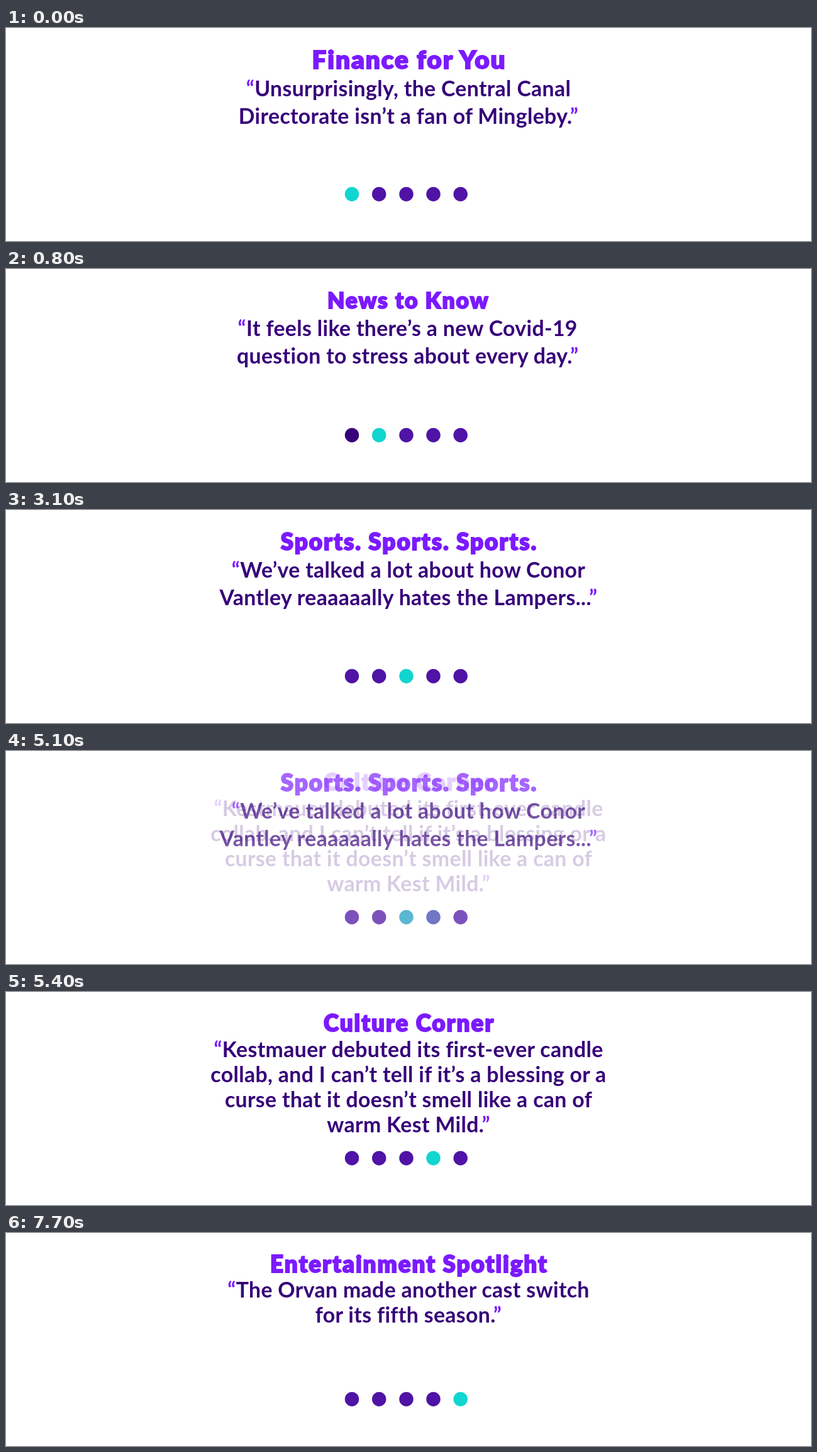
Recreate the animation shown at these times as an HTML page. Size 1280 by 340 pixels, loop 8 s.

```html
<!DOCTYPE html>
<html lang="en">
<head>
<meta charset="utf-8">
<title>Newsletter quotes</title>
<style>
  html, body { margin: 0; width: 100%; height: 100%; overflow: hidden; background: #fff; }
  svg { display: block; width: 1280px; height: 340px; }
  text { font-family: Lato, "Open Sans", sans-serif; text-anchor: middle; font-variant-ligatures: none; }
  .title { font-weight: 900; letter-spacing: 1.9px; fill: #7b1aff; stroke: #7b1aff; stroke-width: 1.8px; }
  .line { font-weight: 700; font-size: 33.8px; letter-spacing: 0.35px; fill: #360079; }
  .mark { fill: #7b1aff; }
</style>
</head>
<body>
<svg id="stage" viewBox="0 0 1280 340"></svg>
<script>
const LOOP = 8000, FIRST = 500, PERIOD = 2300, STEP = 100;
const FADE_IN = [0.2, 0.43, 0.67, 1];
const FADE_OUT = [0.67, 0.43, 0.2, 0];
const DOTS = [550, 593.2, 636.5, 679.5, 722.7];
const TEAL = '#11d5cf', PURPLE = '#4f13a5', DARK = '#360079';

const slides = [
  { title: 'Finance for You', size: 40.5, base: 64.5, x: 640, top: 109, lead: 44,
    lines: ['Unsurprisingly, the Central Canal', 'Directorate isn’t a fan of Mingleby.'] },
  { title: 'News to Know', size: 35.4, base: 63, x: 638.7, top: 107, lead: 44,
    lines: ['It feels like there’s a new Covid-19', 'question to stress about every day.'] },
  { title: 'Sports. Sports. Sports.', size: 36.8, base: 63.5, x: 640, top: 107.5, lead: 44,
    lines: ['We’ve talked a lot about how Conor', 'Vantley reaaaaally hates the Lampers...'] },
  { title: 'Culture Corner', size: 36.8, base: 63, x: 640, top: 103.5, lead: 40,
    lines: ['Kestmauer debuted its first-ever candle', 'collab, and I can’t tell if it’s a blessing or a',
            'curse that it doesn’t smell like a can of', 'warm Kest Mild.'] },
  { title: 'Entertainment Spotlight', size: 36.8, base: 62.5, x: 640, top: 103, lead: 40,
    lines: ['The Orvan made another cast switch', 'for its fifth season.'] }
];

const stage = document.getElementById('stage');

function add(parent, tag, attrs, content = '') {
  const node = document.createElementNS('http://www.w3.org/2000/svg', tag);
  for (const key in attrs) node.setAttribute(key, attrs[key]);
  node.textContent = content;
  return parent.appendChild(node);
}

function draw(slide, index) {
  const group = add(stage, 'g', {});
  const { x, lines } = slide;
  add(group, 'text', { class: 'title', x: x + 1, y: slide.base, 'font-size': slide.size }, slide.title);
  lines.forEach((words, row) => {
    const text = add(group, 'text', { class: 'line', x, y: slide.top + row * slide.lead });
    if (row === 0) add(text, 'tspan', { class: 'mark' }, '“');
    add(text, 'tspan', {}, words);
    if (row === lines.length - 1) add(text, 'tspan', { class: 'mark' }, '”');
  });
  DOTS.forEach((cx, dot) => {
    const fill = dot === index ? TEAL : index === 1 && dot === 0 ? DARK : PURPLE;
    add(group, 'ellipse', { cx, cy: 265.2, rx: 11.2, ry: 11.5, fill });
  });
  return group;
}

function play(group, index) {
  const frames = [];
  const key = (time, opacity) => frames.push({ offset: time / LOOP, opacity, easing: 'step-end' });
  const fade = (start, levels) => levels.forEach((level, i) => key(start + i * STEP, level));
  const last = index === slides.length - 1;
  key(0, index ? 0 : 1);
  if (index) fade(FIRST + (index - 1) * PERIOD, FADE_IN);
  if (!last) fade(FIRST + index * PERIOD, FADE_OUT);
  key(LOOP, last ? 1 : 0);
  group.animate(frames, { duration: LOOP, iterations: Infinity }).startTime = 0;
}

slides.forEach((slide, index) => play(draw(slide, index), index));
</script>
</body>
</html>
```
